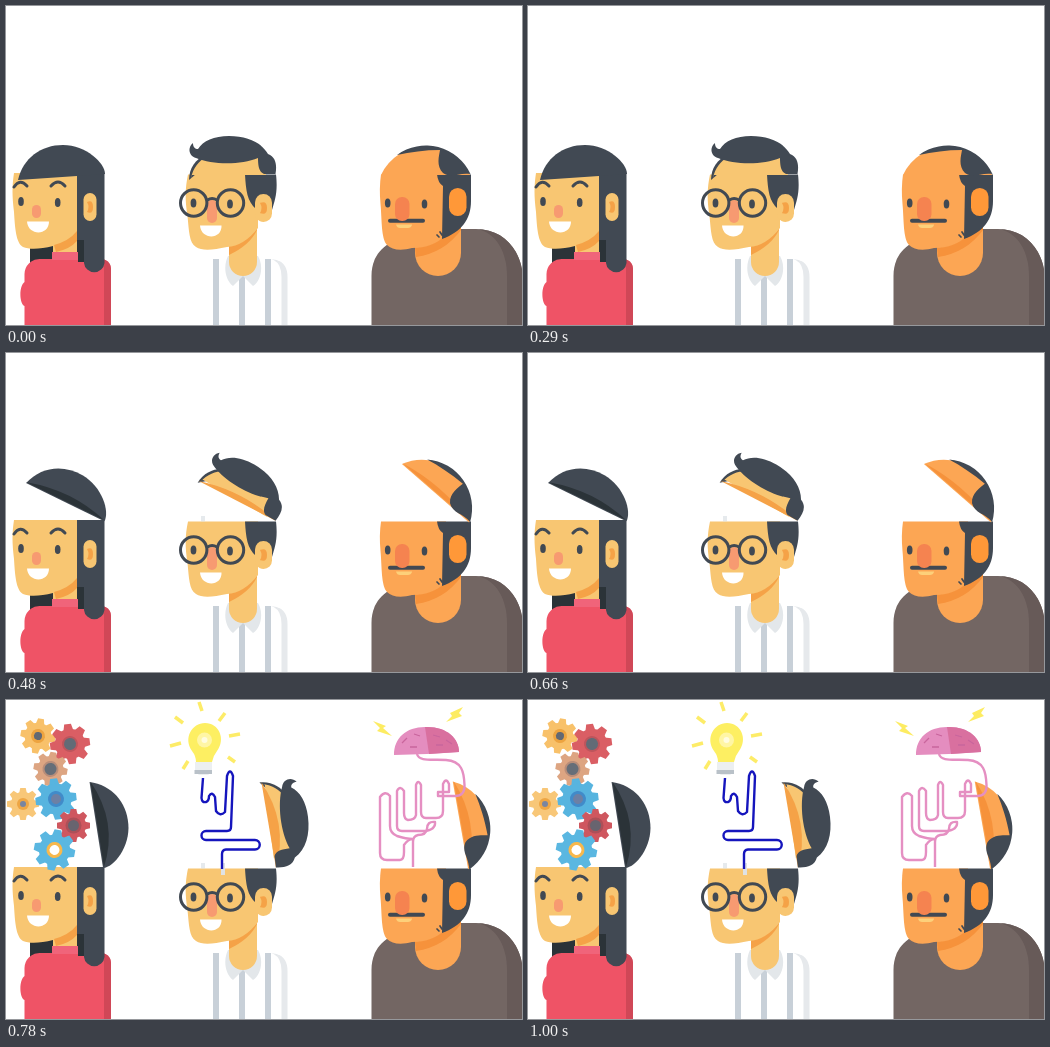
These frames come from a looping animation (516 px wide and 319 px high, 1.14 s). An HTML page:

```html
<!DOCTYPE html>
<html lang="en">
<head>
<meta charset="utf-8">
<title>Open minds</title>
<style>
  html, body { margin: 0; width: 100%; height: 100%; overflow: hidden; background: #fff; }
  svg { display: block; width: 516px; height: 319px; }
  .hair { fill: #414953; }
  .deep { fill: #2b3338; }
  .skin { fill: #f8c672; }
  .shade { fill: #f5a247; }
  .tan { fill: #fca654; }
  .tanShade { fill: #f6923b; }
  .nose { fill: #f79a71; }
  .white { fill: #fff; }
  .stripe { fill: #c8d0d8; }
  .line { fill: none; stroke: #414953; stroke-width: 3; stroke-linecap: round; }
  .wire { fill: none; stroke-width: 2.4; stroke-linejoin: round; }
</style>
</head>
<body>
<svg viewBox="0 0 516 319">
  <!-- Woman -->
  <g>
    <path class="deep" d="M24 236H80V258H24Z"/>
    <path class="skin" d="M8 167H72V248H47V240C35 243 24 244 17 241C10 237 9 222 8 206C6 190 6 180 8 167Z"/>
    <path class="shade" d="M48 239Q63 235 71 225V235Q64 243 50 246Z"/>
    <path fill="#ef5366" d="M18.500 319V300C13 297 13 280 18.500 276V268A15 15 0 0 1 33.500 253H95A10 10 0 0 1 105 263V319Z"/>
    <path fill="#d04757" d="M98 253.500A10 10 0 0 1 105 263V319H98Z"/>
    <path fill="#f0647a" d="M46 246H72V254H46Z"/>
    <path class="hair" d="M71 167H98.500V257A10.300 10.300 0 0 1 78 257V235H71Z"/>
    <path class="deep" d="M71 234H78V256H72V246H71Z"/>
    <rect class="skin" x="77.500" y="187" width="13" height="28" rx="6.500"/>
    <path class="shade" d="M81 196Q87 193 87 201Q87 209 81 206Q84 201 81 196Z"/>
    <path class="line" d="M8 181Q14 172 21 180M45 180Q52 172 59 180"/>
    <ellipse class="hair" cx="15" cy="195.500" rx="2.800" ry="4.600"/>
    <ellipse class="hair" cx="51.700" cy="196.500" rx="2.800" ry="4.600"/>
    <rect class="nose" x="26" y="199" width="9" height="13" rx="4.500"/>
    <path class="white" d="M21 215.500H43C43 230 22 230 21 215.500Z"/>
  </g>
  <g class="cap" data-pivot="98 167" data-turns="0 30 85">
    <path class="hair" d="M12 174C17 152 35 139 57 139C80 139 99 157 99 168L71 170Z"/>
    <path class="under deep" data-tip="12 173"/>
  </g>

  <!-- Young man -->
  <g>
    <path class="stripe" d="M207 253H213V319H207ZM233 268H239V319H233ZM259 253H265V319H259Z"/>
    <path fill="#e6e9ec" d="M265 253Q281.500 254 281.500 271V319H275.500V271Q275.500 256 265 253Z"/>
    <path fill="#e3e7ea" d="M222 250C217 260 219 274 227 280L237 270L247 280C255 275 258 260 252 250Z"/>
    <path class="skin" d="M223 220H251V256A14 14 0 0 1 223 256Z"/>
    <path class="shade" d="M223 238L251 218V224Q244 239 223 249Z"/>
    <path class="skin" d="M182 168.500H252V222Q238 240 221 241C207 244 196 245 190 241C183 237 183 224 181.500 210C179 194 179 183 182 168.500Z"/>
    <path class="hair" d="M239 168.500H270C272 186 269 194 266 204L250 203C241 195 240 185 239 168.500Z"/>
    <rect class="skin" x="249" y="188" width="17" height="28" rx="8.500"/>
    <path class="shade" d="M254 197Q261 194 261 202Q261 210 254 207Q257 202 254 197Z"/>
    <ellipse class="hair" cx="187.500" cy="197" rx="2.900" ry="4.600"/>
    <ellipse class="hair" cx="224" cy="198" rx="2.900" ry="4.600"/>
    <rect class="nose" x="201" y="194" width="10" height="23" rx="5"/>
    <path class="white" d="M194 219.500H215.500C216 234 195 234 194 219.500Z"/>
    <g class="line">
      <circle cx="187.700" cy="197" r="13.200"/><circle cx="224.500" cy="197" r="13.200"/>
      <path d="M201.500 194Q206 191 211 194"/>
    </g>
  </g>
  <g class="cap" data-pivot="270 168" data-turns="0 30 83">
    <path class="hair" d="M183 174C183 162 190 153 199 149L206 152L190 168Z"/>
    <path class="skin" d="M185 172C187 162 193 155 200 151H254L260 169H186Z"/>
    <path class="under shade" data-tip="183 172"/>
    <path class="hair" d="M187 137C181 142 183 150 190 152C207 159 235 159 252 152C252 160 253 166 258 168H269.500C271 159 270 151 262 148C255 136 241 130 223 130C208 130 197 135 192 143C189 143 187 141 187 137Z"/>
  </g>

  <!-- Older man -->
  <g>
    <path fill="#736663" d="M365.500 319V270C365.500 245 384 232 409 230L455 223H470C499 223 517 246 517 275V319Z"/>
    <path fill="#675a58" d="M470 223C499 223 517 246 517 275V319H501V270C501 244 489 226 470 223Z"/>
    <path class="tan" d="M409 220H455V247A23 23 0 0 1 409 247Z"/>
    <path class="tanShade" d="M409 242Q432 238 455 212V224Q438 247 410 251Z"/>
    <path class="tan" d="M375 168.500H440V229Q427 242 406 242C395 245 386 244 381 239C375 232 376 214 374.500 198Q373 182 375 168.500Z"/>
    <path class="hair" d="M431 168.500H465V195C465 214 455 226 436 233L437 180Q432 177 431 168.500Z"/>
    <rect fill="#ff9838" x="443" y="182" width="17.500" height="28" rx="8.700"/>
    <path class="line" style="stroke-width:1.700" d="M431 229L433 231M434 226L436 229"/>
    <ellipse class="hair" cx="381.700" cy="197" rx="2.800" ry="4.600"/>
    <ellipse class="hair" cx="418.500" cy="198" rx="2.800" ry="4.600"/>
    <path class="line" style="stroke-width:4" d="M384 214.800H417"/>
    <rect fill="#f58350" x="389" y="191" width="14.500" height="24" rx="7"/>
    <path fill="#fdd07a" d="M390 218.500H406V219Q405 222 402 222H394Q391 222 390 218.500Z"/>
  </g>
  <g class="cap" data-pivot="463 168" data-turns="0 41 80">
    <path class="tan" d="M375 169A49 49 0 0 1 464 169Z"/>
    <path class="under tanShade" data-tip="375 168"/>
    <path class="hair" d="M391 149A49 49 0 0 1 464.500 168C453 166 446 173 437 167C430 160 433 150 434 144C419 144 404 146 391 149Z"/>
  </g>

  <path class="pose stripe" data-from="1" opacity=".45" d="M195 163H199V168.500H195Z"/>

  <!-- Ideas -->
  <g class="pose" data-from="2">
    <g id="gears"></g>

    <path fill="#dfe2e5" d="M215 163H219V175H215Z"/>
    <path class="wire" stroke="#1515bd" d="M197 78L195.500 98Q196 103 200 102Q203 101 203 96Q206 91 209 97L210 111Q214 117 219 112L221 76Q224 67 227 76L225 127Q225 131 221 131H200A4.500 4.500 0 0 0 200 140H249A4.700 4.700 0 0 1 249 149.500H220Q216 150 216 154V169"/>
    <path d="M193 2L196 11M219 13L213 21M223 36L234 34M222 57L229 62M164 46L175 43M169 17L177 23M182 61L177 69" fill="none" stroke="#fdec68" stroke-width="3.500"/>
    <path fill="#fdef62" d="M190 62Q190 56 186 51C177 38 186 23 199 23C213 23 220 39 211 51Q207 56 206 62Z"/>
    <circle cx="198.500" cy="40" r="7.500" fill="#fff6a5"/>
    <circle cx="198.500" cy="40" r="3" fill="#fffce0"/>
    <path fill="#eceff1" d="M189 62H206V72L202 75H193L189 72Z"/>
    <path d="M188.500 72H206" stroke="#b9c1c8" stroke-width="4"/>

    <path class="wire" stroke="#e58fc2" d="M411 54C413 62 426 59 440 60C456 61 458 72 458.500 85Q459 96 449 96H432V92H443V84Q440 77 437 84V111Q437 118 430 118H420Q415 118 415 112V85Q412 79 410 85V115Q409 120 402 120Q398 119 398 113V91Q394 85 391 91V126Q391 131 396 131H418Q430 130 429 122Q421 121 421 129Q420 135 412 135Q407 136 407 142V167M407 139Q400 139 391 136Q384 133 384 126V96Q379 90 374 97V153Q374 160 381 160H394Q398 160 398 152V145Q402 139 407 139"/>
    <path fill="#e48dbf" d="M388 55C388 38 400 27 419 27C440 26 453 38 453 52L421 54Z"/>
    <path fill="#d9709f" d="M419 27C440 26 453 38 453 52L423 54Z"/>
    <path d="M396 43L401 38M404 47H411M408 34L414 36M427 35L434 37M430 45H437M440 40L446 44" stroke="#c9659d" stroke-width="1.300"/>
    <path fill="#fdec62" d="M367 21L380 26L377 28L386 36L371 31L374 28ZM457 7L444 13L446 16L440 22L456 16L453 13Z"/>
  </g>
</svg>
<script>
const STARTS = [0, 480, 780], LOOP = 1140, TEETH = 8;
const all = selector => [...document.querySelectorAll(selector)];

// One tapered tooth per step around a solid disc.
function gear(x, y, radius, turn, color, ring, ringRadius, hub, hubRadius) {
  const root = radius * 0.76, foot = radius * 0.25, crown = radius * 0.17;
  const tooth = `M${root - 2} ${-foot}L${radius} ${-crown}V${crown}L${root - 2} ${foot}Z`;
  const teeth = Array.from({ length: TEETH }, (_, i) =>
    `<path d="${tooth}" transform="rotate(${i * 360 / TEETH})"/>`).join('');
  return `
    <g transform="translate(${x} ${y}) rotate(${turn})" fill="${color}">
      ${teeth}
      <circle r="${root}"/>
      <circle r="${ringRadius}" fill="${ring}"/>
      <circle r="${hubRadius}" fill="${hub}"/>
    </g>`;
}

document.getElementById('gears').innerHTML = [
  [32, 36, 17.5, 10, '#f8c16a', '#eda440', 7, '#626873', 4],
  [64, 44, 20, -7, '#da5e64', '#bd555c', 8, '#626b76', 6],
  [44.5, 69, 17, 10, '#dda582', '#b88d79', 8, '#666e78', 6],
  [17, 104, 16, 0, '#f8c778', '#eea644', 6, '#7985a0', 3],
  [50, 99, 20.5, -7, '#57b4df', '#418bc9', 8, '#6d80a4', 5],
  [67.5, 125.5, 16.5, 0, '#cf575f', '#ad5058', 8, '#68646f', 5.5],
  [48.5, 150, 20.5, 10, '#5ab7e1', '#f8b84c', 8, '#fff', 5]
].map(spec => gear(...spec)).join('');

const point = text => text.split(' ').map(Number);
const caps = all('.cap').map(group => {
  const under = group.querySelector('.under');
  return { group, under, tip: point(under.dataset.tip), pivot: point(group.dataset.pivot), turns: point(group.dataset.turns) };
});

function showPose(pose) {
  const depth = [0, 10, 18][pose];
  for (const { group, under, tip, pivot, turns } of caps) {
    group.setAttribute('transform', `rotate(${turns[pose]} ${pivot})`);
    under.setAttribute('d', `M${tip}Q${(tip[0] + pivot[0]) / 2} ${pivot[1] - depth} ${pivot}Z`);
    under.style.display = depth ? '' : 'none';
  }
  for (const part of all('.pose')) {
    part.style.display = pose >= part.dataset.from ? '' : 'none';
  }
}

function tick(now) {
  const time = now % LOOP;
  showPose(STARTS.filter(start => time >= start).length - 1);
  requestAnimationFrame(tick);
}
tick(performance.now());
</script>
</body>
</html>
```
